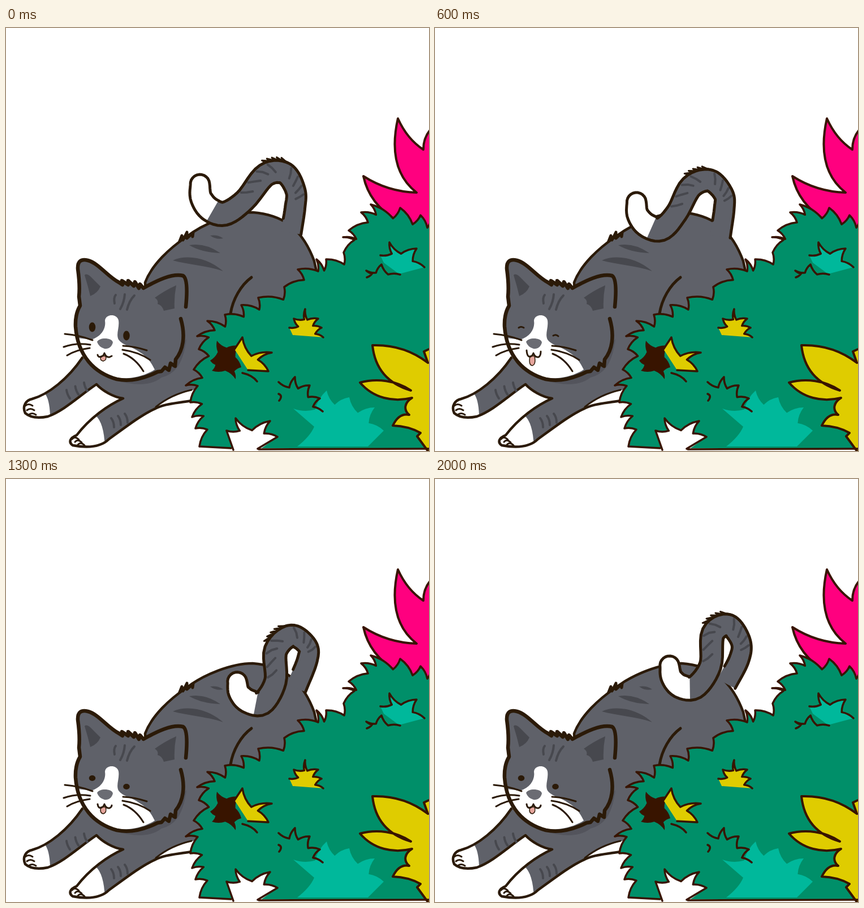
An HTML page that plays this animation: 748x748 px, repeating every 2100 ms.

```html
<!DOCTYPE html>
<html lang="en">
<head>
<meta charset="utf-8">
<title>Stretching cat</title>
<style>
html, body { margin: 0; width: 100%; height: 100%; overflow: hidden; background: #fff; }
svg { display: block; width: 100vw; height: 100vh; }
path, ellipse, use { stroke-linecap: round; stroke-linejoin: round; }
.ink { fill: none; stroke: #2b1a08; stroke-width: 5; }
.thin { stroke-width: 3; }
.bold { stroke-width: 6.5; }
.fur { fill: #5f6169; }
.mark { fill: none; stroke: #47484e; stroke-width: 4; }
.dark { fill: #47484e; }
.shade { fill: #53545c; }
.white { fill: #fff; }
.bush { fill: #008f69; }
.teal { fill: #00b89b; }
.pink { fill: #ff007f; }
.gold { fill: #dfcc00; }
.soil { fill: #381400; }
.edge { stroke: #381400; stroke-width: 4; }
.line { fill: none; stroke: #381400; stroke-width: 3.5; }
</style>
</head>
<body>
<svg viewBox="0 0 748 748">
  <defs>
    <path id="bodyShape" d="M246 450C258 418 290 389 318 370C350 345 400 326 436 326C485 330 522 350 545 412L560 480L345 640L328 659C300 664 280 664 262 674C240 684 215 703 182 727C168 741 145 743 118 738C110 732 113 725 125 720C148 690 180 667 207 655C190 653 170 641 160 630C130 650 104 676 74 687C55 691 42 688 34 681C28 668 36 658 46 656C75 648 110 620 135 583L250 520Z"/>
    <path id="headShape" d="M309 514C318 545 313 570 300 586L299 598L291 593L288 605L281 600L275 607L268 608C240 622 215 625 196 621C156 610 127 580 123 528Q122 506 131 491L129 475Q131 455 127 426Q126 406 145 411C164 416 180 440 200 450L206 454L205 447L216 454L216 447L226 456L228 449L235 460L237 453L243 460C266 447 294 433 313 438Q323 443 318 493"/>
    <clipPath id="bodyClip"><use href="#bodyShape"/></clipPath>
  </defs>

  <g>
    <use href="#bodyShape" class="fur"/>
    <g clip-path="url(#bodyClip)">
      <path class="white" d="M20 640L70 648Q79 662 78 700L20 700ZM100 750L110 690L158 685Q175 699 175 750ZM262 673Q292 649 335 639L340 662L270 678Z"/>
      <path class="shade" d="M190 622C230 634 258 632 275 618C302 611 314 590 319 550L295 580L240 611Z"/>
    </g>
    <path class="dark" d="M361 367Q374 365 384 372Q372 375 361 367ZM324 384Q352 379 379 398Q346 397 324 384ZM295 411C320 399 358 407 384 430C355 420 320 418 295 411Z"/>
    <use href="#bodyShape" class="ink" style="stroke-width:4.5"/>
    <path class="ink" d="M307 377L311 367L313 375L320 361L320 372L331 362L330 369M434 441C415 455 401 480 397 505"/>
    <path class="ink thin" d="M265 670Q292 648 328 640"/>
    <g id="limbs"></g>
  </g>

  <g id="tail"></g>

  <g>
    <use href="#headShape" class="fur"/>
    <path class="dark" d="M139 437Q143 432 154 444L167 457Q162 469 149 474Q145 456 139 437ZM301 455Q281 464 263 477Q270 481 268 488Q276 490 279 500L298 496Q297 475 301 455Z"/>
    <path class="mark" d="M194 472Q190 477 192 487M210 471Q209 485 202 497M227 473Q218 482 214 498"/>
    <path class="white" d="M175 518C175 506 196 504 199 517C201 530 194 541 199 551C207 562 224 563 236 573C250 581 257 592 263 604C240 619 205 624 180 615C157 607 138 590 130 570Q130 556 126 548L151 551C170 545 177 530 175 518Z"/>
    <path fill="#6b6c73" d="M161 555C166 546 188 548 189 556C187 565 180 568 174 567Q164 564 161 555Z"/>
    <use href="#headShape" class="ink bold"/>
    <path class="ink thin" d="M104 541Q130 543 153 552M102 564Q124 556 149 560M108 579Q124 569 148 566M207 562Q228 563 249 570M206 569Q235 573 255 587M208 576Q229 584 243 607"/>
    <g id="face"></g>
  </g>

  <g id="garden"></g>
</svg>
<script>
const $ = id => document.getElementById(id);
const path = (cls, d) => `<path class="${cls}" d="${d}"/>`;
const poly = pts => 'M' + pts.map(p => p.map(v => v.toFixed(1)).join(' ')).join('L');

// Leafy edge through the tips. Each notch lies `depth` inside the line between
// two tips, `lead` of the way along; both sides of a leaf bend the same way.
function crest(text, depth, lead = 0.5) {
  const tips = text.split(' ').map(p => p.split(',').map(Number));
  const bend = 0.16 * Math.sign(depth);
  const curve = ([x, y], [u, v], b) =>
    `Q${(x + u) / 2 - (v - y) * b} ${(y + v) / 2 + (u - x) * b} ${u} ${v}`;
  return 'M' + tips[0] + tips.slice(1).map((tip, i) => {
    const [x, y] = tips[i], dx = tip[0] - x, dy = tip[1] - y, k = depth / Math.hypot(dx, dy);
    const notch = [x + dx * lead + dy * k, y + dy * lead - dx * k];
    return curve(tips[i], notch, -bend) + curve(notch, tip, bend);
  }).join('');
}

function drawGarden() {
  const hedge = crest('752,334 733,331 697,318 645,312 628,326 606,358 596,370 597,397 566,409 549,409 516,427 ' +
    '492,458 446,477 416,490 387,507 356,518 338,545 341,568 332,604 318,632 326,662 329,688 335,708 342,740', 20, 0.2);
  const sprout = crest('501,530 509,514 529,497 552,514 558,530 561,547', -13);
  const bloom = crest('418,547 470,574 464,607', -22);
  const fern = crest('662,402 678,379 726,390 740,423', -15);
  const lily = crest('390,712 406,690 467,695 480,723', -19);
  $('garden').innerHTML =
    path('pink edge', 'M752 178Q738 193 738 215C715 200 702 180 693 160C684 200 680 255 726 291C690 290 660 280 632 262C640 300 665 325 692 341L752 352Z') +
    path('bush', hedge + 'L400 743L748 743Z') + path('line edge', hedge) +
    path('teal', crest('508,673 567,641 607,653 652,671 668,712', -20) + 'L640 740L515 740Q538 722 545 705Z') +
    path('teal', fern + 'L695 435L668 415Z') + path('line', fern) +
    path('line', crest('638,441 637,429 664,418 697,436', -10)) +
    path('gold', sprout + 'L507 543Z') + path('line', sprout) +
    path('soil', crest('373,553 411,562 416,600 406,621 364,606 361,588 373,553', -8) + 'Z') +
    path('gold', bloom + 'L428 605L404 568Z') + path('line', 'M404 568L418 547' + bloom + 'L428 605M418 610Q436 614 444 625') +
    path('line', 'M483 659Q490 650 482 647' + crest('482,626 511,617 537,632 555,655 560,678', -15)) +
    path('gold edge', 'M752 566L739 572L746 592C715 568 680 560 648 561C652 600 672 628 716 641C690 623 655 619 626 627C650 655 685 662 718 654C705 662 702 675 713 684Q695 680 684 703Q712 704 733 716L727 722L746 748L752 752Z') +
    path('white', lily + 'L445 748L402 748Z') + path('line edge', 'M402 746L390 712' + lily + 'L445 744') +
    path('line edge', 'M343 740L398 743M447 745L748 744');
}

function drawLimbs() {
  const row = (x, y, dx, dy, bar) =>
    [0, 1, 2].map(i => `M${x + dx * i} ${y + dy * i}${bar}`).join('');
  $('limbs').innerHTML =
    path('mark', row(107, 640, 15.5, -6.5, 'q1 8 6 15') + row(186, 690, 12, -4, 'q5 6 5 16')) +
    path('ink thin', row(34, 668, 3, 8, 'q6 -5 13 0') + row(117, 727, 5, 5, 'q5 -6 12 1'));
}

// Tail centre line from tip to base: x, y, travel right, travel down.
const joints = [
  [343, 276, 80, 84], [345, 300, 82, 79], [361, 321, 82, 73], [388, 328, 81, 68], [423, 304, 71, 53],
  [459, 260, 32, 44], [493, 257, 25, 22], [512, 288, 33, 9], [511, 319, 33, 2], [504, 362, 14, 10]
];
const radii = [17, 19, 21, 20.5, 19, 20, 19, 17, 17.5, 18];
const swing = (t, half) => (1 - Math.cos(Math.PI * t / half)) / 2;

// The tip leads, the arch recoils a little, and the base follows.
function poseAt(t) {
  return joints.map(([x, y, dx, dy], k) => {
    const lag = 1.4 + 0.3 * Math.max(0, k - 3);
    const recoil = 11 * Math.exp(-((k - 5.5) ** 2) / 2) * Math.sin(Math.PI * t / 1700);
    const half = Math.max(1000, 1420 - 1.5 * k ** 3);
    return [x + dx * swing(t, 1700) ** lag - recoil, y + dy * swing(t, half), radii[k]];
  });
}

function spline(points) {
  const last = points.length - 1;
  const get = i => i < 0 ? points[0].map((v, k) => 2 * v - points[1][k])
    : i > last ? points[last].map((v, k) => 2 * v - points[last - 1][k]) : points[i];
  return s => {
    const i = Math.min(Math.floor(s), last - 1), u = s - i;
    const [a, b, c, d] = [-1, 0, 1, 2].map(k => get(i + k));
    return b.map((v, k) => v + u / 2 * (c[k] - a[k] +
      u * (2 * a[k] - 5 * v + 4 * c[k] - d[k] + u * (3 * v - a[k] - 3 * c[k] + d[k]))));
  };
}

function tailMarkup(t) {
  const points = poseAt(t), at = spline(points);
  const side = (s, k) => {
    const [x, y, r] = at(s), p = at(Math.max(s - 0.01, 0)), q = at(Math.min(s + 0.01, 9));
    const tx = q[0] - p[0], ty = q[1] - p[1], n = Math.hypot(tx, ty);
    return [x - ty / n * r * k, y + tx / n * r * k];
  };
  const run = (from, to, k) => Array.from({ length: 41 }, (_, i) => side(from + (to - from) * i / 40, k));
  const [x0, y0, r0] = points[0], [ex, ey] = side(0, 1);
  const start = Math.atan2(ey - y0, ex - x0);
  const cap = Array.from({ length: 13 }, (_, i) => {
    const a = start + Math.PI * (1 - i / 12);
    return [x0 + r0 * Math.cos(a), y0 + r0 * Math.sin(a)];
  });
  const wrap = end => poly([...run(end, 0, -1), ...cap, ...run(0, end, 1)]);
  const stripes = (from, count) => Array.from({ length: count }, (_, i) => from + i * 0.38)
    .map(s => poly([side(s, -0.75), side(s + 0.12, -0.35), side(s + 0.25, 0.05)])).join('');
  const tuft = Array.from({ length: 11 }, (_, i) => side(5.2 + i * 0.07 - i % 2 * 0.14, i % 2 ? -1.28 : -1));
  return path('fur', poly([...run(5.7, 9, -1), ...run(9, 5.7, 1)]) + 'Z') +
    path('mark', stripes(6.1, 4)) +
    path('ink', poly(run(5.7, 9, -1)) + poly(run(5.7, 8.5, 1))) +
    path('fur', wrap(5.9) + 'Z') +
    path('white', wrap(2.18 + 0.45 * Math.min(t / 1700, 1)) + 'Z') +
    path('mark', stripes(4.1, 4)) +
    path('ink', wrap(5.9)) + path('ink thin', poly(tuft));
}

function faceMarkup(step) {
  const closed = step >= 3 && step <= 8 || step >= 15 && step <= 18;
  const wide = step === 0;
  const eye = (x, y) => `<ellipse cx="${x}" cy="${y}" rx="5.8" ry="${wide ? 8.5 : 5}" fill="#2b1a08"/>`;
  const lids = 'M148 530Q152 527 157 530M209 544Q214 541 218 545';
  const open = closed ? 5 : wide ? -3 : 0;
  const tongue = `M168 580Q165 ${591 + open} 172 ${592 + open}Q179 ${590 + open} 176 580Z`;
  const smile = `M162 ${575 - open}Q163 583 169 581Q173 579 174 575Q177 583 183 582Q187 580 187 ${577 - open}`;
  return (closed ? path('ink thin', lids) : eye(152.5, 529) + eye(213, 544)) +
    `<path class="ink" d="${tongue}" style="fill:#e5a59c;stroke-width:1.5"/>` + path('ink thin', smile);
}

let shown = -1;
function draw() {
  const step = Math.floor(performance.now() % 2100 / 100);
  if (step !== shown) {
    shown = step;
    $('tail').innerHTML = tailMarkup(step * 100);
    $('face').innerHTML = faceMarkup(step);
  }
  requestAnimationFrame(draw);
}

drawGarden();
drawLimbs();
draw();
</script>
</body>
</html>
```
